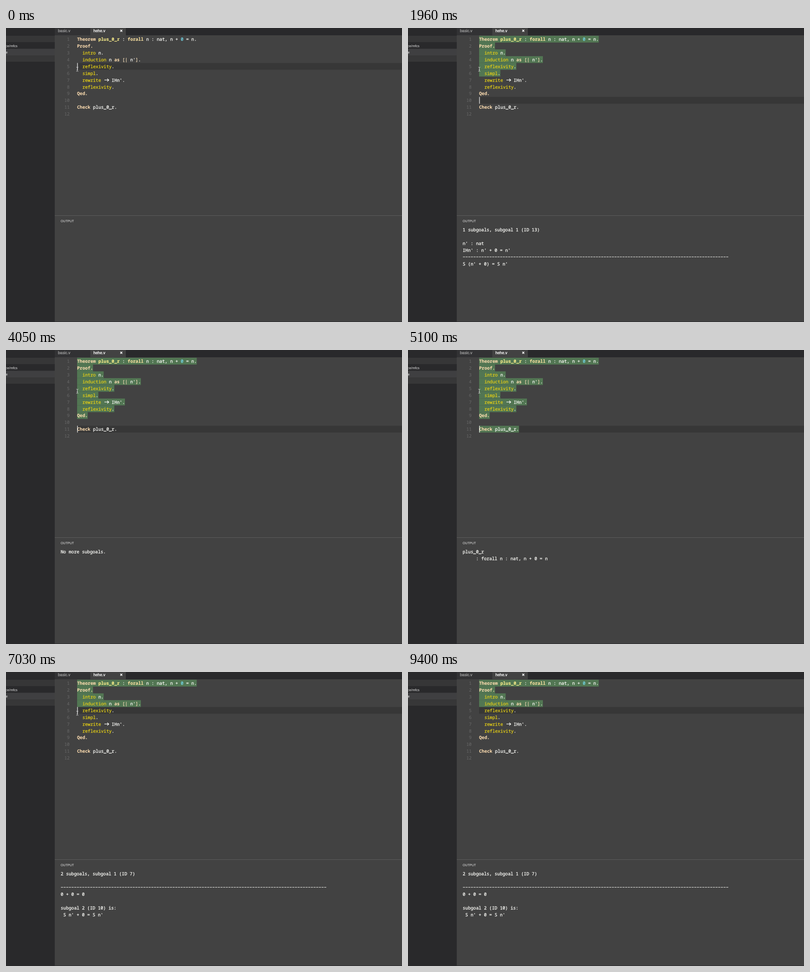
These frames come from a looping animation (869 by 645 pixels, 10 s). An HTML page:

```html
<!DOCTYPE html>
<html lang="en">
<head>
<meta charset="utf-8">
<title>Proof stepping</title>
<style>
  html, body { margin: 0; width: 100%; height: 100%; overflow: hidden; background: #424242; }
  svg { display: block; width: 869px; height: 645px; }
  text { white-space: pre; text-rendering: geometricPrecision; }
  .code { font: 500 9.725px "Noto Sans Mono", "DejaVu Sans Mono", monospace; color: #f8f8f4; }
  .code text, .code tspan { fill: currentColor; stroke: currentColor; stroke-width: .32; }
  .ui { font-family: "Liberation Sans", Arial, sans-serif; }
  .tab { font-size: 8.7px; stroke-width: .3; }
  .code .num { color: #696969; text-anchor: end; stroke-width: 0; }
  .code .k, .code .f, .code .d { font-weight: 600; stroke-width: .08; }
  .k { color: #fcdcb0; }
  .f { color: #fde3a2; }
  .d { color: #fdf08c; }
  .t { color: #dfca18; }
  .b { color: #e6cfae; }
  .n { color: #74dcee; }
</style>
</head>
<body>
<svg viewBox="0 0 869 645">
  <rect width="869" height="645" fill="#424242"/>
  <rect width="107" height="645" fill="#29292b"/>
  <rect y="17" width="107" height="14" fill="#363637"/>
  <rect y="45.5" width="107" height="14.5" fill="#3f3f41"/>
  <rect y="60" width="107" height="14" fill="#373738"/>
  <rect x="107" width="762" height="16" fill="#29292b"/>
  <rect x="107" width="78" height="16" fill="#323234"/>
  <rect x="185" width="78" height="16" fill="#424242"/>
  <g class="ui">
    <text class="tab" x="114" y="9" fill="#a0a0a0" stroke="#a0a0a0">basic.v</text>
    <text class="tab" x="191.7" y="9" fill="#fff" stroke="#fff">hehe.v</text>
    <text x="-1" y="41.5" font-size="7.6" fill="#e6e6e6">ce/mfcs</text>
    <text x="-.5" y="56" font-size="7.6" fill="#e6e6e6">e</text>
    <text x="120" y="426.3" font-size="7.1" fill="#f0f0f0">OUTPUT</text>
  </g>
  <path d="M250.8 3.8l4.4 4.4m0-4.4l-4.4 4.4" stroke="#fff" stroke-width="1.5"/>
  <rect x="107" y="411" width="762" height="1" fill="#5c5c5c"/>
  <rect x="107" y="644" width="762" height="1" fill="#2c2c2e"/>
  <rect id="band" x="156" width="713" height="14.9" fill="#373737"/>
  <g id="marks" fill="#527653"></g>
  <g id="code" class="code"></g>
  <path d="M216 114.2h9.6m-3.4-3l3.4 3l-3.4 3" fill="none" stroke="#f8f8f4" stroke-width="1.2"/>
  <g id="outputs" class="code"></g>
  <rect id="caret" x="156.3" width="1.2" height="14.9" fill="#fff"/>
  <path id="mouse" d="M-2.3 -4.6Q0 -4.6 0 -3.2Q0 -4.6 2.3 -4.6M0 -3.4V3.4M-2.3 4.6Q0 4.6 0 3.2Q0 4.6 2.3 4.6M-1.2 1.2H1.2"
    fill="none" stroke="#d8d8d8" stroke-width=".9"/>
</svg>
<script>
const LOOP = 10000, FRAME = LOOP / 67, BLINK = 500;
const PITCH = 5.835, ROW = 14.92, LEFT = 156, OUT_LEFT = 120;
const $ = id => document.getElementById(id);

// each piece is "class:text"
const LINES = [
  ["k:Theorem", "w: ", "d:plus_0_r", "w: : ", "f:forall", "w: n : nat, n + ", "n:0", "w: = n."],
  ["k:Proof."],
  ["t:  intro", "w: n."],
  ["t:  induction", "w: n ", "k:as", "b: [|", "w: n'", "b:]", "w:."],
  ["t:  reflexivity", "w:."],
  ["t:  simpl", "w:."],
  ["t:  rewrite", "w:    IHn'."],
  ["t:  reflexivity", "w:."],
  ["k:Qed."],
  [],
  ["k:Check", "w: plus_0_r."],
  []
];

const RULE = "---";
const OUTPUTS = {
  base: ["2 subgoals, subgoal 1 (ID 7)", "", RULE, "0 + 0 = 0", "", "subgoal 2 (ID 10) is:", " S n' + 0 = S n'"],
  step: ["1 subgoals, subgoal 1 (ID 13)", "", "n' : nat", "IHn' : n' + 0 = n'", RULE, "S (n' + 0) = S n'"],
  done: ["No more subgoals."],
  type: ["plus_0_r", "     : forall n : nat, n + 0 = n"]
};

// Times are in ticks of FRAME ms. Each run marks lines at once and answers REPLY ticks later.
const REPLY = 2;
const RUNS = [
  { at: 1, checked: 4, output: "base" },
  { at: 8, checked: 6, output: "step" },
  { at: 16, checked: 9, output: "done" },
  { at: 30, checked: 11, output: "type" },
  { at: 45, checked: 4, output: "base" }
];

// The caret walks one line per tick until it reaches its goal.
const WALKS = [
  { at: -1.62, to: 5 },
  { at: 3.62, to: 7 },
  { at: 10.62, to: 10 },
  { at: 26.62, to: 11 },
  { at: 29.62, to: 12 },
  { at: 33.23, to: 5 }
];

const EXIT = { at: 56, ticks: 2, from: [156.5, 90.5], to: [746.5, 630] };

const rowTop = line => 17 + ROW * (line - 1);
const show = (el, on) => el.setAttribute("visibility", on ? "visible" : "hidden");

function add(parent, tag, attrs, text) {
  const el = document.createElementNS("http://www.w3.org/2000/svg", tag);
  for (const name in attrs) el.setAttribute(name, attrs[name]);
  if (text !== undefined) el.textContent = text;
  return parent.appendChild(el);
}

const marks = LINES.map((parts, i) => {
  const y = 28.1 + ROW * i;
  add($("code"), "text", { x: 139.6, y, class: "num" }, i + 1);
  const row = add($("code"), "text", { x: LEFT, y });
  for (const part of parts) add(row, "tspan", { class: part[0] }, part.slice(2));
  const width = row.textContent.length * PITCH;
  return add($("marks"), "rect", { x: LEFT, y: rowTop(i + 1), width, height: ROW });
});

const outputs = {};
for (const name in OUTPUTS) {
  const group = outputs[name] = add($("outputs"), "g", {});
  OUTPUTS[name].forEach((row, i) => {
    const y = 446 + ROW * i;
    if (row !== RULE) return add(group, "text", { x: OUT_LEFT, y }, row);
    add(group, "path", {
      d: `M${OUT_LEFT + 0.6} ${y - 3.5}h${100 * PITCH - 1}`,
      stroke: "#f8f8f4", "stroke-width": 1, "stroke-dasharray": `4.5 ${PITCH - 4.5}`
    });
  });
}

function caretAt(tick) {
  let line = 5, moved = 0;
  for (const { at, to } of WALKS) {
    if (tick < at) break;
    const steps = Math.min(Math.floor(tick - at) + 1, Math.abs(to - line));
    line += Math.sign(to - line) * steps;
    moved = at + Math.max(steps - 1, 0);
  }
  const on = Math.floor((tick - moved) * FRAME / BLINK) % 2 === 0;
  return { line, on };
}

function draw(t) {
  const tick = Math.floor((t + 10) / FRAME) % 67;

  const caret = caretAt(tick), top = rowTop(caret.line);
  $("band").setAttribute("y", top);
  $("caret").setAttribute("y", top);
  show($("caret"), caret.on);

  const run = RUNS.filter(r => r.at <= tick).pop();
  marks.forEach((mark, i) => show(mark, run && i < run.checked));
  const answer = run && tick >= run.at + REPLY ? run.output : "";
  for (const name in outputs) show(outputs[name], name === answer);

  const p = Math.max(0, (tick - EXIT.at) / EXIT.ticks);
  const spot = EXIT.from.map((v, i) => v + (EXIT.to[i] - v) * p);
  $("mouse").setAttribute("transform", `translate(${spot})`);
  show($("mouse"), p <= 1);
}

const start = performance.now();
function loop() {
  draw((performance.now() - start) % LOOP);
  requestAnimationFrame(loop);
}
loop();
</script>
</body>
</html>
```
